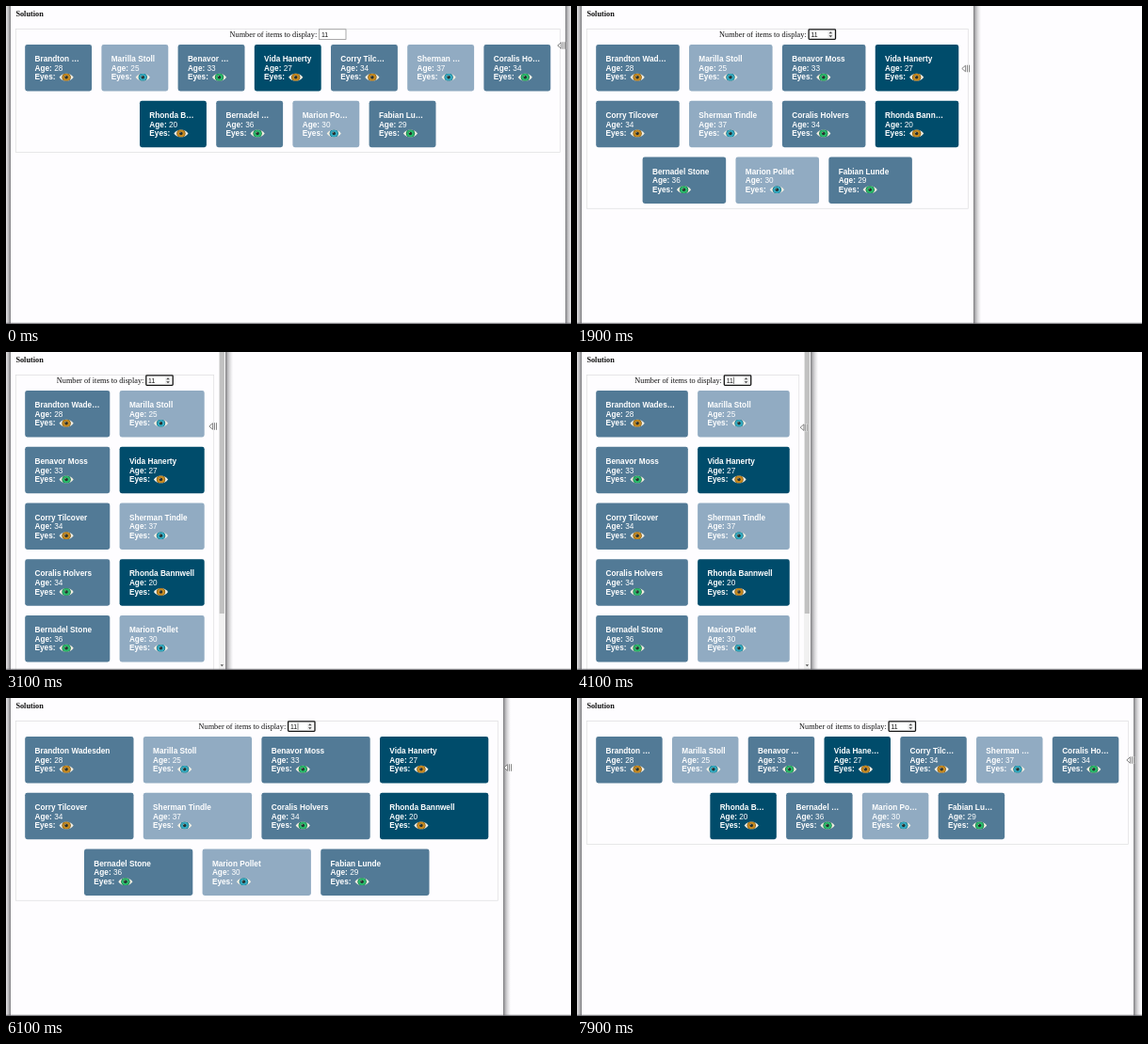
An HTML page with a canvas that plays this animation: 600 by 338 pixels, repeating every 8000 ms.

```html
<!DOCTYPE html>
<html lang="en">
<head>
<meta charset="utf-8">
<title>Responsive cards</title>
<style>
html, body { margin: 0; width: 100%; height: 100%; overflow: hidden; background: #fefdff; }
canvas { display: block; width: 600px; height: 338px; }
</style>
</head>
<body>
<canvas id="stage"></canvas>
<script>
const W = 600, H = 338, LOOP = 8000, STEP = 100;
const SANS = '"Liberation Sans", Arial, sans-serif';
const SERIF = '"Liberation Serif", "Times New Roman", serif';
const SIZE = 8.25, GAP = 10.3, ROW = 59.75, CARD_H = 49.4, TOP = 41.1, LEFT = 20.2;
const BOLD = `bold ${SIZE}px ${SANS}`;
const PAGE = '#fefdff';
const SHADE = { mid: '#527a96', light: '#91abc2', dark: '#004c6b' };
const IRIS = {
  amber: ['#c58a22', '#7a5410'],
  blue: ['#35a9bf', '#176a80'],
  green: ['#2bb96c', '#137044']
};
const people = [
  ['Brandton Wadesden', 28, 'mid', 'amber'],
  ['Marilla Stoll', 25, 'light', 'blue'],
  ['Benavor Moss', 33, 'mid', 'green'],
  ['Vida Hanerty', 27, 'dark', 'amber'],
  ['Corry Tilcover', 34, 'mid', 'amber'],
  ['Sherman Tindle', 37, 'light', 'blue'],
  ['Coralis Holvers', 34, 'mid', 'green'],
  ['Rhonda Bannwell', 20, 'dark', 'amber'],
  ['Bernadel Stone', 36, 'mid', 'green'],
  ['Marion Pollet', 30, 'light', 'blue'],
  ['Fabian Lunde', 29, 'mid', 'green']
];

// Monotone cubic curve through [time, value] points.
function curve(pts) {
  const n = pts.length - 1;
  const slope = pts.slice(1).map((p, i) => (p[1] - pts[i][1]) / (p[0] - pts[i][0]));
  const tan = pts.map((p, i) => {
    if (i === 0 || i === n) return 0;
    const a = slope[i - 1], b = slope[i];
    return a * b <= 0 ? 0 : 2 * a * b / (a + b);
  });
  return t => {
    if (t <= pts[0][0]) return pts[0][1];
    if (t >= pts[n][0]) return pts[n][1];
    let i = 0;
    while (t > pts[i + 1][0]) i++;
    const [t0, a] = pts[i], [t1, b] = pts[i + 1];
    const d = t1 - t0, u = (t - t0) / d, v = 1 - u;
    return a * (1 + 2 * u) * v * v + b * u * u * (3 - 2 * u)
      + d * (tan[i] * u * v * v - tan[i + 1] * u * u * v);
  };
}

const edgeAt = curve([[100, 594], [1000, 541], [1900, 421], [2800, 271], [3100, 233],
  [3500, 208], [3800, 217], [4600, 327], [4900, 367], [5500, 431], [6100, 528],
  [6400, 553], [7300, 584], [7900, 591]]);
const lagAt = curve([[4200, 0], [4600, 5], [4900, 8.3], [5500, 5], [6100, 0]]);
const gripAt = curve([[0, -4], [1000, -9], [1900, -8], [3100, -13], [4900, 0], [6100, 5], [7900, -3]]);
const gripY = curve([[0, 42], [1000, 47.5], [1900, 66.5], [3100, 79], [4900, 80.5], [6100, 74], [7900, 66]]);

const canvas = document.getElementById('stage');
const c = canvas.getContext('2d');
const dpr = window.devicePixelRatio || 1;
canvas.width = W * dpr;
canvas.height = H * dpr;

function rect(x, y, w, h, color) {
  c.fillStyle = color;
  c.fillRect(x, y, w, h);
}

function frame(x, y, w, h, color, line) {
  c.strokeStyle = color;
  c.lineWidth = line;
  c.strokeRect(x, y, w, h);
}

function text(s, x, y, font, color) {
  c.font = font;
  c.fillStyle = color;
  c.fillText(s, x, y);
}

function poly(points, color) {
  c.beginPath();
  points.forEach(([x, y]) => c.lineTo(x, y));
  c.closePath();
  c.fillStyle = color;
  c.fill();
}

function disc(x, y, rx, ry, color) {
  c.beginPath();
  c.ellipse(x, y, rx, ry, 0, 0, 7);
  c.fillStyle = color;
  c.fill();
}

function clip(s, room) {
  c.font = BOLD;
  if (c.measureText(s).width <= room) return s;
  let n = s.length;
  while (n > 1 && c.measureText(s.slice(0, n) + '…').width > room) n--;
  return s.slice(0, n) + '…';
}

function eye(x, y, [iris, ring]) {
  c.beginPath();
  c.moveTo(x - 7.6, y);
  c.bezierCurveTo(x - 4, y - 5.2, x + 4, y - 5.2, x + 7.6, y);
  c.bezierCurveTo(x + 4, y + 5.2, x - 4, y + 5.2, x - 7.6, y);
  c.fillStyle = '#f1eee2';
  c.fill();
  c.save();
  c.clip();
  disc(x, y, 4.7, 4.5, ring);
  disc(x, y, 4, 3.8, iris);
  disc(x, y, 1.7, 1.7, '#26302f');
  disc(x - 1, y - 1.1, 0.6, 0.6, '#fff');
  c.restore();
  c.strokeStyle = 'rgba(50,50,40,.65)';
  c.lineWidth = 0.6;
  c.stroke();
}

function card([name, age, shade, iris], x, y, w) {
  c.beginPath();
  c.roundRect(x, y, w, CARD_H, 2.4);
  c.fillStyle = SHADE[shade];
  c.fill();
  const tx = x + GAP, base = y + 18;
  text(clip(name, w - 2 * GAP), tx, base, BOLD, '#fff');
  text('Age:', tx, base + 9.65, BOLD, '#fff');
  text(age, tx + 2.5 * SIZE, base + 9.65, `${SIZE}px ${SANS}`, '#fff');
  text('Eyes:', tx, base + 19.3, BOLD, '#fff');
  eye(tx + 33.6, y + 34.6, IRIS[iris]);
}

function cards(right, cols) {
  const w = (right - LEFT - (cols - 1) * GAP) / cols, pitch = w + GAP;
  people.forEach((p, i) => {
    const row = Math.floor(i / cols);
    const inRow = Math.min(cols, people.length - row * cols);
    const x = LEFT + (cols - inRow) * pitch / 2 + (i % cols) * pitch;
    card(p, x, TOP + row * ROW, w);
  });
}

function counter(mid, focused, caret) {
  const x = mid - 61.8, ix = x + 95;
  text('Number of items to display:', x, 32.8, `${SIZE}px ${SERIF}`, '#111');
  rect(ix, 24.8, 28.4, 10.6, '#fff');
  if (focused) {
    c.beginPath();
    c.roundRect(ix, 24.8, 28.4, 10.6, 0.8);
    c.strokeStyle = '#151515';
    c.lineWidth = 1.3;
    c.stroke();
    const sx = ix + 23.2;
    rect(sx - 3, 26.3, 6, 7.8, '#efefef');
    poly([[sx - 1.8, 29.2], [sx, 27.2], [sx + 1.8, 29.2]], '#444');
    poly([[sx - 1.8, 31.2], [sx, 33.2], [sx + 1.8, 31.2]], '#444');
    if (caret) rect(ix + 10.1, 26.6, 0.6, 7.2, '#222');
  } else {
    frame(ix, 24.8, 28.4, 10.6, '#858585', 0.7);
  }
  text('11', ix + 2.3, 32.6, `6.9px ${SANS}`, '#111');
}

function scrollbar(edge) {
  const x = edge - 7;
  rect(x, 0, 6.6, H, '#f1f1f1');
  rect(x + 0.7, 0, 5.2, 278, '#c1c1c1');
  poly([[x + 1.6, 332.2], [x + 5, 332.2], [x + 3.3, 334.2]], '#505050');
}

function shadow(x, dir) {
  const g = c.createLinearGradient(x, 0, x + 8 * dir, 0);
  [0.62, 0.36, 0.2, 0.09, 0].forEach((a, i) => g.addColorStop(i / 4, `rgba(40,40,44,${a})`));
  rect(Math.min(x, x + 8 * dir), 0, 8, H, g);
}

function grip(x, y) {
  c.beginPath();
  c.moveTo(x - 4.2, y);
  c.lineTo(x - 0.4, y - 3.3);
  c.lineTo(x - 0.4, y + 3.3);
  c.closePath();
  c.fillStyle = '#fff';
  c.fill();
  c.strokeStyle = '#666';
  c.lineWidth = 0.8;
  c.stroke();
  rect(x + 0.8, y - 4, 3.4, 8, '#fff');
  rect(x + 1.1, y - 3.8, 0.8, 7.6, '#666');
  rect(x + 3.1, y - 3.8, 0.8, 7.6, '#666');
}

function draw(t) {
  c.setTransform(dpr, 0, 0, dpr, 0, 0);
  rect(0, 0, W, H, PAGE);
  const edge = edgeAt(t);
  const view = edge - lagAt(t);
  const cols = view > 533 ? 7 : view > 311 ? 4 : 2;
  const narrow = cols === 2;
  const right = view - 5.7 - (narrow ? 6.6 : 0);
  const rows = Math.ceil(people.length / cols);

  shadow(5, -1);
  shadow(edge, 1);
  text('Solution', 10.4, 10.8, `bold ${SIZE}px ${SERIF}`, '#111');
  frame(10.5, 24.4, right - 10.5, TOP + rows * ROW - 5.1 - 24.4, '#dededf', 0.7);
  counter((10.5 + right) / 2, t >= 200, t % 1200 < 600);
  cards(right - 10, cols);
  if (narrow) scrollbar(edge);
  rect(0, 336.8, W, 1, '#626266');
  grip(edge + gripAt(t), gripY(t));
}

function tick() {
  const t = performance.now() % LOOP;
  draw(Math.floor(t / STEP) * STEP);
  requestAnimationFrame(tick);
}
tick();
</script>
</body>
</html>
```
